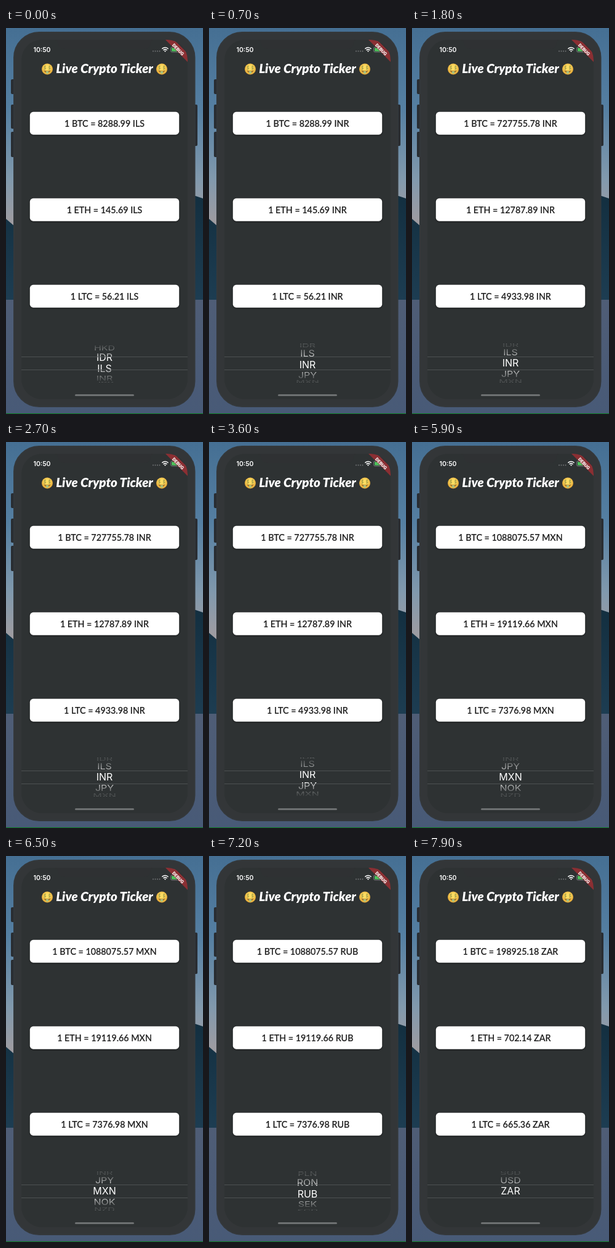
An HTML page for the animation above (8 s loop, 320x625 px).

```html
<!DOCTYPE html>
<html lang="en">
<head>
<meta charset="utf-8">
<title>Live Crypto Ticker</title>
<style>
  html, body { margin: 0; width: 100%; height: 100%; overflow: hidden; background: #2e3133; }
  svg { display: block; width: 320px; height: 625px; }
  text { text-anchor: middle; }
  .title { font: italic 900 20.6px Lato, sans-serif; fill: #fff; }
  .clock { font: 600 10.5px Inter, sans-serif; fill: #fff; }
  .debug { font: 800 7.4px Roboto, sans-serif; fill: #fff; }
  .card rect { fill: #fff; filter: drop-shadow(0 1.5px 1.5px #0007); }
  .card text { font: 500 14.3px Lato, sans-serif; fill: #1c1c1c; stroke: #1c1c1c; stroke-width: .2; }
  #wheel text { font: 400 16px Inter, sans-serif; fill: #fff; }
</style>
</head>
<body>
<svg viewBox="0 0 320 625">
  <defs>
    <linearGradient id="sky" x2="0" y2="1">
      <stop offset="0" stop-color="#456f93"/>
      <stop offset=".4" stop-color="#557fa2"/>
      <stop offset=".75" stop-color="#8199ad"/>
      <stop offset="1" stop-color="#a39c9f"/>
    </linearGradient>
    <linearGradient id="hill" x2="0" y2="1">
      <stop offset="0" stop-color="#132f40"/>
      <stop offset="1" stop-color="#1d3d52"/>
    </linearGradient>
    <linearGradient id="lake" x2="0" y2="1">
      <stop offset="0" stop-color="#4f5d76"/>
      <stop offset="1" stop-color="#485a77"/>
    </linearGradient>
    <linearGradient id="fade" gradientUnits="userSpaceOnUse" x1="0" y1="511" x2="0" y2="574">
      <stop offset="0" stop-color="#2e3233" stop-opacity=".95"/>
      <stop offset=".12" stop-color="#2e3233" stop-opacity=".75"/>
      <stop offset=".24" stop-color="#2e3233" stop-opacity=".48"/>
      <stop offset=".34" stop-color="#2e3233" stop-opacity=".22"/>
      <stop offset=".35" stop-color="#2e3233" stop-opacity="0"/>
      <stop offset=".66" stop-color="#2e3233" stop-opacity="0"/>
      <stop offset=".67" stop-color="#2e3233" stop-opacity=".22"/>
      <stop offset=".77" stop-color="#2e3233" stop-opacity=".48"/>
      <stop offset=".88" stop-color="#2e3233" stop-opacity=".75"/>
      <stop offset="1" stop-color="#2e3233" stop-opacity=".95"/>
    </linearGradient>
    <radialGradient id="skin" cy=".4">
      <stop offset=".4" stop-color="#fbdc62"/>
      <stop offset="1" stop-color="#eab03c"/>
    </radialGradient>
    <clipPath id="window"><rect x="25" y="511.5" width="270" height="62"/></clipPath>
    <clipPath id="screen"><rect x="25" y="19" width="270" height="582" rx="33"/></clipPath>
    <g id="face">
      <circle r="9" fill="url(#skin)"/>
      <path d="M-5.5 2Q0 4 5.5 2Q4 6 0 6T-5.5 2Z" fill="#a0702c"/>
      <path d="M-2 3.5H2V6Q2 7.6 0 7.6T-2 6Z" fill="#a9c27c"/>
      <g fill="none" stroke="#9c9a45" stroke-width=".8">
        <path id="eye" d="M-2-4.5Q-5.5-5-5-3T-2.5-1.3T-5.5.3M-3.7-5.8V1.2"/>
        <use href="#eye" x="7.4"/>
      </g>
    </g>
  </defs>

  <rect width="320" height="325" fill="url(#sky)"/>
  <path d="M0 309L14 321H300V272H308L320 276V441H0Z" fill="url(#hill)"/>
  <rect y="440" width="320" height="185" fill="url(#lake)"/>
  <rect y="624" width="320" height="1" fill="#0a7a1c"/>

  <g fill="#292d32">
    <rect x="8" y="83" width="6" height="24" rx="2"/>
    <rect x="8" y="124" width="6" height="39" rx="2"/>
    <rect x="8" y="168" width="6" height="41" rx="2"/>
    <rect x="305" y="124" width="6" height="67" rx="2"/>
  </g>
  <rect x="13" y="7" width="293.5" height="606" rx="41" fill="#333638" stroke="#34383b" stroke-width="2"/>
  <rect x="25" y="19" width="270" height="582" rx="33" fill="#2e3233"/>
  <path d="M79 19H240Q235 19 235 23Q235 34 224 34H96Q84 34 84 23Q84 19 79 19Z" fill="#2f3133"/>

  <text class="clock" x="58.5" y="39">10:50</text>
  <g fill="#777a7b">
    <circle cx="239" cy="37.5" r=".9"/><circle cx="242.5" cy="37.5" r=".9"/>
    <circle cx="246" cy="37.5" r=".9"/><circle cx="249.5" cy="37.5" r=".9"/>
  </g>
  <g fill="none" stroke="#fff" stroke-width="1.5">
    <path d="M253.4 33.8Q258.5 29.2 263.6 33.8M255.4 36Q258.5 33.3 261.6 36"/>
    <path d="M257.2 37.2H259.8L258.5 38.6Z" fill="#fff" stroke-width=".6"/>
  </g>
  <rect x="267.5" y="31" width="15.5" height="8" rx="2.2" fill="none" stroke="#8a8d8e" stroke-width=".8"/>
  <rect x="269" y="32.3" width="12" height="5.4" rx="1" fill="#4cc35c"/>
  <g clip-path="url(#screen)">
    <path d="M259 19H273L295 41V55Z" fill="#8b2f33"/>
  </g>
  <text class="debug" transform="translate(279.5 35) rotate(45)" y="2.4">DEBUG</text>

  <use href="#face" x="67" y="66.5"/>
  <text class="title" x="160" y="73">Live Crypto Ticker</text>
  <use href="#face" x="253" y="66.5"/>

  <g id="cards"></g>

  <g clip-path="url(#window)">
    <g id="wheel"></g>
    <rect x="25" y="511" width="270" height="63" fill="url(#fade)"/>
  </g>
  <path d="M25 532.5H295M25 553.5H295" stroke="#4d5152"/>
  <rect x="112" y="593" width="96" height="3" rx="1.5" fill="#6d7071"/>
</svg>
<script>
const LOOP = 8000, ANGLE = 0.56, RADIUS = 32.8, CENTER = 542.6;
const coins = ['BTC', 'ETH', 'LTC'];
const currencies = ('AUD BRL CAD CNY EUR GBP HKD IDR ILS INR JPY ' +
  'MXN NOK NZD PLN RON RUB SEK SGD USD ZAR').split(' ');

// [start, end, rows scrolled]
const scrolls = [[-450, 900, 2], [3300, 4300, 1], [4900, 5600, 1], [6500, 7850, 9]];
// [time, prices]
const quotes = [
  [0, '8288.99', '145.69', '56.21'],
  [1200, '727755.78', '12787.89', '4933.98'],
  [5000, '1088075.57', '19119.66', '7376.98'],
  [7800, '198925.18', '702.14', '665.36']
];

function add(parent, tag, attrs) {
  const el = document.createElementNS('http://www.w3.org/2000/svg', tag);
  for (const key in attrs) el.setAttribute(key, attrs[key]);
  return parent.appendChild(el);
}

const byId = id => document.getElementById(id);
const labels = coins.map((coin, i) => {
  const y = 135.8 + 140 * i;
  const card = add(byId('cards'), 'g', { class: 'card' });
  add(card, 'rect', { x: 38.8, y, width: 242.4, height: 36.9, rx: 5.5 });
  return add(card, 'text', { x: 160, y: y + 23.8 });
});
const rows = currencies.map(name => {
  const row = add(byId('wheel'), 'text', {});
  row.textContent = name;
  return row;
});

function ease(t, start, end) {
  const u = Math.min(1, Math.max(0, (t - start) / (end - start)));
  return u * u * (3 - 2 * u);
}

function draw(t) {
  const pos = scrolls.reduce((sum, [a, b, n]) => sum + n * ease(t, a, b), 7);
  rows.forEach((row, i) => {
    const a = (i - pos) * ANGLE;
    const visible = Math.abs(a) < 1.5;
    row.style.display = visible ? '' : 'none';
    if (visible) row.setAttribute('transform',
      `translate(160 ${CENTER + RADIUS * Math.sin(a)}) scale(1 ${Math.cos(a)}) translate(0 5.8)`);
  });
  const prices = quotes.filter(q => q[0] <= t).pop();
  const currency = currencies[Math.round(pos)];
  labels.forEach((label, i) => {
    label.textContent = `1 ${coins[i]} = ${prices[i + 1]} ${currency}`;
  });
}

const begin = performance.now();
function tick() {
  draw((performance.now() - begin) % LOOP);
  requestAnimationFrame(tick);
}
tick();
</script>
</body>
</html>
```
